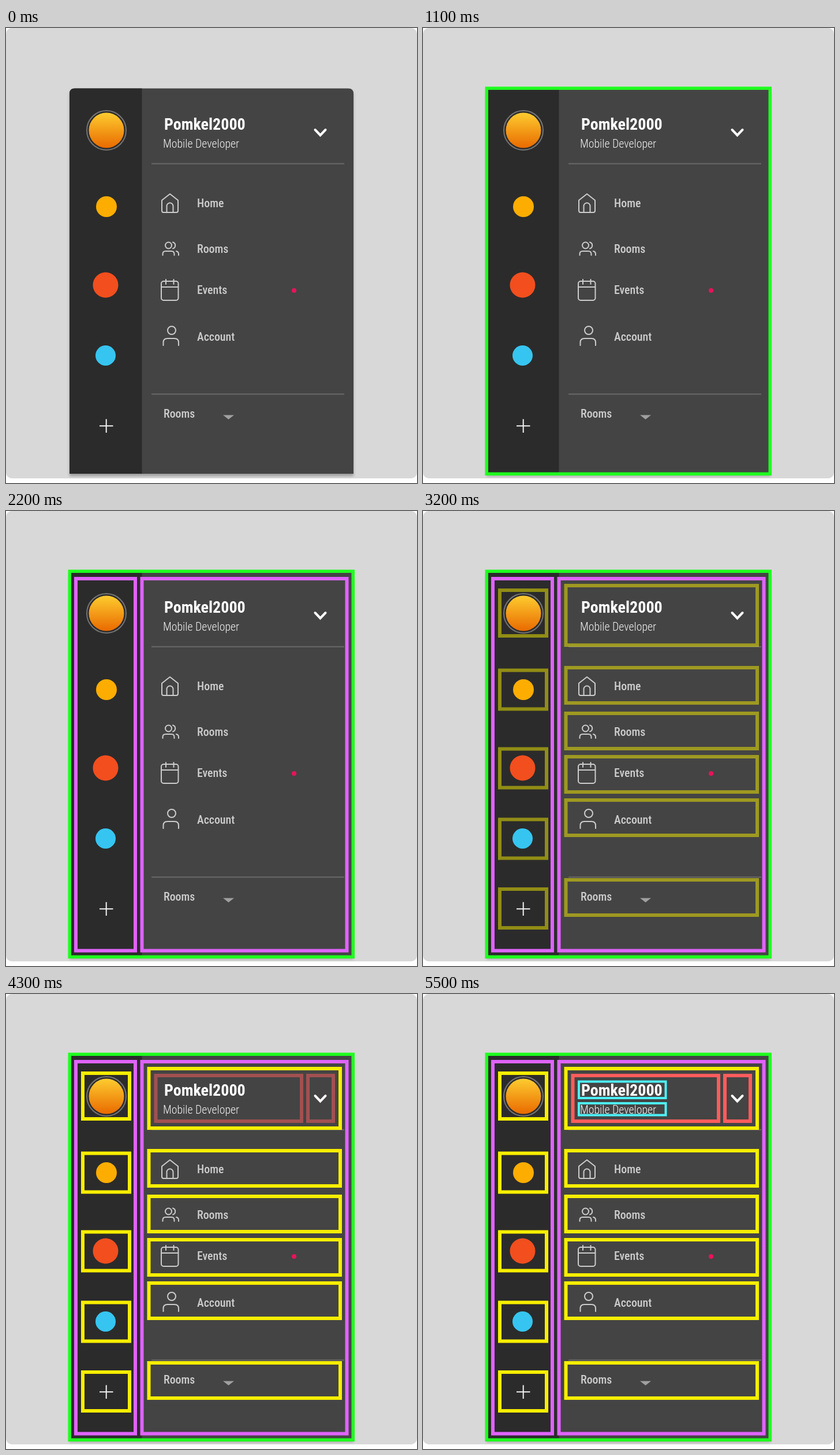
An HTML page for the animation above (6.5 s loop, 712 by 787 pixels).

```html
<!DOCTYPE html>
<html lang="en">
<head>
<meta charset="utf-8">
<title>Menu layout</title>
<style>
  html, body { margin: 0; width: 100%; height: 100%; overflow: hidden; background: #fff; }
  svg { display: block; width: 712px; height: 787px; }
  text { font-family: "Roboto Condensed", Roboto, sans-serif; font-stretch: 75%; font-size: 19.8px; font-weight: 500; fill: #ccc; }
  .name { font-size: 28px; font-weight: 700; fill: #fff; }
  .role { font-weight: 300; fill: #f2f2f2; }
  .card { filter: drop-shadow(0 4px 2px rgba(0, 0, 0, .27)); }
  .icons { fill: none; stroke: #ccc; stroke-width: 2; stroke-linecap: round; stroke-linejoin: round; }
  .boxes { fill: none; }
</style>
</head>
<body>
<svg viewBox="0 0 712 787">
  <defs>
    <linearGradient id="sun" x2="0" y2="1">
      <stop stop-color="#fdcc2f"/>
      <stop offset="1" stop-color="#e96a00"/>
    </linearGradient>
  </defs>
  <rect width="712" height="779" rx="10" fill="#d8d8d8"/>

  <path class="card" d="M110 771V113.5q0-9 9-9H593q9 0 9 9V771Z" fill="#444"/>
  <path d="M110 771V113.5q0-9 9-9H235.5V771Z" fill="#2b2b2b"/>
  <path d="M252 234.7H586M252 633.3H586" stroke="#686868" stroke-width="2"/>

  <circle cx="174" cy="177" r="34" fill="none" stroke="#757575" stroke-width="2"/>
  <circle cx="174" cy="177" r="30.5" fill="url(#sun)"/>
  <circle cx="174" cy="309" r="18" fill="#fdad00"/>
  <circle cx="172.5" cy="444.5" r="22" fill="#f24e1e"/>
  <circle cx="172.5" cy="566.5" r="17.5" fill="#36c5f0"/>
  <path d="M162 688.3H185.5M173.7 676.5V700" stroke="#f2f2f2" stroke-width="2"/>

  <text class="name" x="274" y="176">Pomkel2000</text>
  <text class="role" x="272" y="207">Mobile Developer</text>
  <path d="M535.5 176L544.5 185.5L553.5 176" fill="none" stroke="#fff" stroke-width="4" stroke-linecap="round"/>

  <g class="icons">
    <path d="M270 298L284 287L298 298V316q0 3-3 3H273q-3 0-3-3ZM278.5 319V308a5.5 5.5 0 0 1 11 0V319"/>
    <circle cx="281.5" cy="376" r="5.5"/>
    <path d="M271.5 393v-2q0-5 5-5h10q5 0 5 5v2M289 370.5a5.7 5.7 0 0 1 0 11M299 393v-2q0-4-4-5"/>
    <rect x="269" y="438" width="29.5" height="33" rx="4"/>
    <path d="M269 448H298M277 435V443M290.5 435V443"/>
    <circle cx="287" cy="523" r="7"/>
    <path d="M272.5 549V544q0-7 7-7H292q7 0 7 7V549"/>
  </g>
  <text x="331" y="310">Home</text>
  <text x="331" y="389">Rooms</text>
  <text x="331" y="460">Events</text>
  <text x="331" y="541">Account</text>
  <text x="273" y="674">Rooms</text>
  <circle cx="499" cy="454" r="4" fill="#e8135c"/>
  <path d="M376 669.5H395L385.5 677Z" fill="#a0a0a0"/>
</svg>
<script>
const svg = document.querySelector('svg');
const add = (parent, tag, attrs) => {
  const el = document.createElementNS(svg.namespaceURI, tag);
  for (const key in attrs) el.setAttribute(key, attrs[key]);
  return parent.appendChild(el);
};

// Boxes nest: each level is inset in, or cut from, the level around it
const box = (cx, cy, w, h) => ({ x: cx - w / 2, y: cy - h / 2, w, h });
const inset = ({ x, y, w, h }, d, top = d) => ({ x: x + d, y: y + top, w: w - 2 * d, h: h - d - top });
const cut = ({ x, y, w, h }, left, gap) => [
  { x, y, w: left, h },
  { x: x + left + gap, y, w: w - left - gap, h }
];

const frame = box(355.75, 437.75, 496.5, 672.5);
const columns = cut(inset(frame, 10.5, 12.5), 109, 5.5);
const rail = [176.5, 309, 445, 567, 687.5].map((y, i) => box(173.5, y, 87, i ? 73 : 85));
const header = box(413.25, 180.5, 337.5, 109);
const rows = [301.5, 380.5, 455.5, 530.5, 668.5].map(y => box(413.25, y, 337.5, 67));
const headerParts = cut(inset(header, 12), 258.5, 5);
const title = { ...inset(headerParts[0], 11.5), w: 154.5 };
const lines = [{ ...title, h: 32.5 }, { ...title, y: title.y + 37.5, h: 24.5 }];

const layers = [
  ['#1fff1f', 5.5, [frame]],
  ['#df63fa', 6, columns],
  ['#f7ee00', 6, [...rail, header, ...rows]],
  ['#ff5c5c', 6, headerParts],
  ['#4df1f7', 4, lines]
].map(([stroke, width, boxes]) => {
  const g = add(svg, 'g', { class: 'boxes', stroke, 'stroke-width': width });
  for (const b of boxes) {
    const { x, y, w, h } = inset(b, width / 2);
    add(g, 'rect', { x, y, width: w, height: h });
  }
  return g;
});

// Each level shows at half strength for 100 ms, then fully
function draw(now) {
  const t = now % 6500;
  layers.forEach((g, i) => {
    const age = t - 1000 - 1100 * i;
    g.setAttribute('opacity', age < 0 ? 0 : age < 100 ? 0.5 : 1);
  });
  requestAnimationFrame(draw);
}
draw(performance.now());
</script>
</body>
</html>
```
